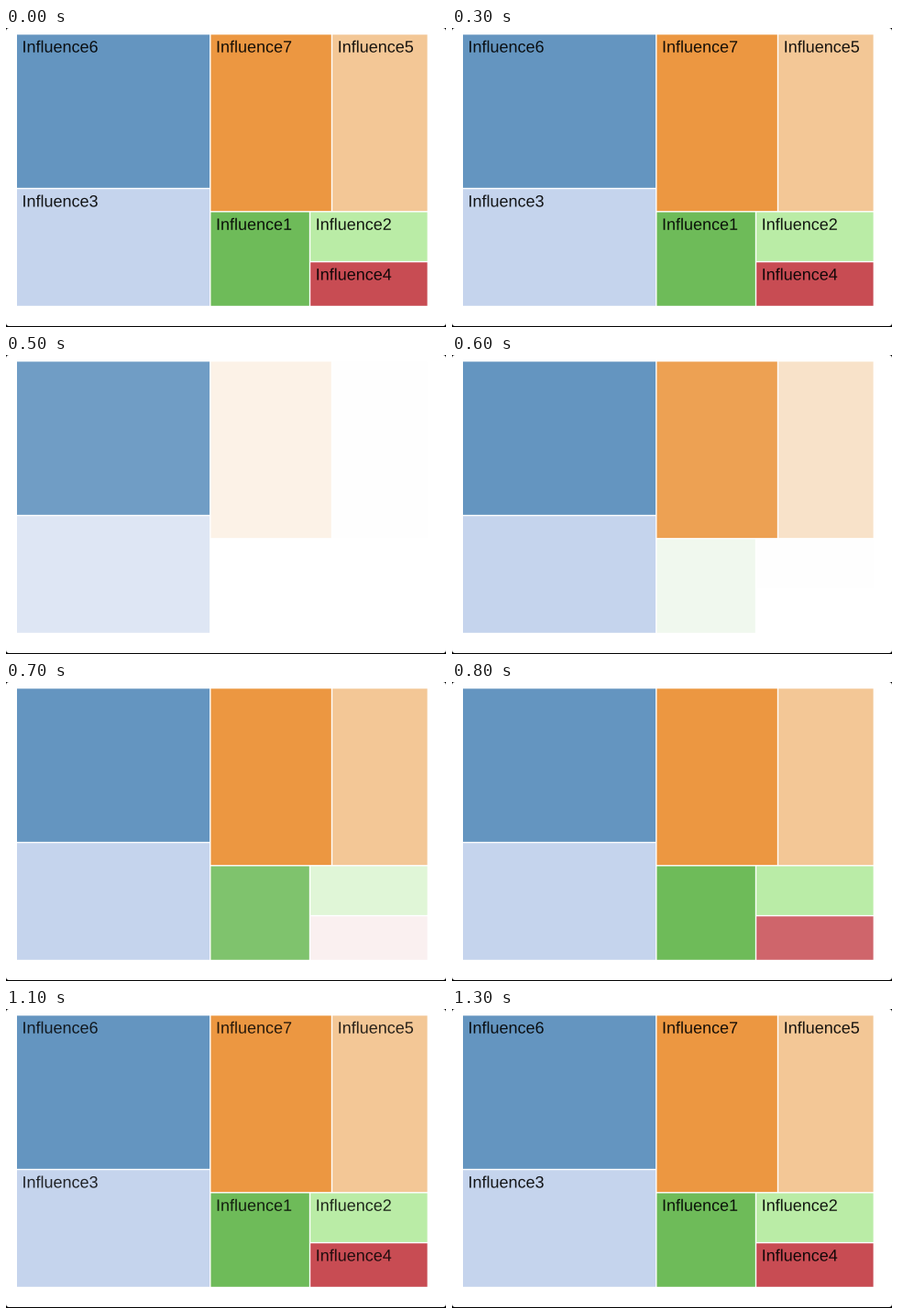
Write a matplotlib script that moves like this. It is 480 px wide and 327 px high and loops after 1.4 s.

```python
import matplotlib.pyplot as plt
from matplotlib.animation import FuncAnimation
from matplotlib.patches import FancyBboxPatch, PathPatch, Rectangle
from matplotlib.textpath import TextPath
from matplotlib.transforms import Affine2D

W, H, DPI = 480, 327, 100
STEP, FRAMES = 100, 14
RESTART = 400                              # the full chart holds until here
CELL_START, CELL_STAGGER, CELL_FADE = 317, 52.5, 250
TEXT_START, TEXT_FADE, TEXT_ALPHA = 785, 430, 0.9
GAP = 0.7

# label, left, top, right, bottom, colour, in order of appearance
CELLS = [
    ("Influence6", 11.3, 6.6, 222.8, 175.5, "#6495c0"),
    ("Influence3", 11.3, 175.5, 222.8, 304.5, "#c5d4ed"),
    ("Influence7", 222.8, 6.6, 355.5, 200.8, "#ec9741"),
    ("Influence5", 355.5, 6.6, 460.3, 200.8, "#f3c796"),
    ("Influence1", 222.8, 200.8, 331.5, 304.5, "#6ebb59"),
    ("Influence2", 331.5, 200.8, 460.3, 255.6, "#baeca6"),
    ("Influence4", 331.5, 255.6, 460.3, 304.5, "#c84c53"),
]


def ease(u):
    """Cubic in-out, clamped to 0..1."""
    u = min(max(u, 0), 1)
    return 4 * u ** 3 if u < 0.5 else 1 - 4 * (1 - u) ** 3


def make_label(x, baseline, text):
    """Text as an outline, so that it can sit between whole pixels."""
    path = TextPath((0, 0), text, size=18, prop={"family": "Liberation Sans"})
    placed = Affine2D().scale(1, -1).translate(x, baseline).transform_path(path)
    return ax.add_patch(PathPatch(placed, fc="black", lw=0, snap=False, zorder=3))


fig = plt.figure(figsize=(W / DPI, H / DPI), dpi=DPI, facecolor="black")
ax = fig.add_axes([0, 0, 1, 1])
ax.set(xlim=(0, W), ylim=(H, 0))
ax.axis("off")
ax.add_patch(FancyBboxPatch((0, 0), W, 326, boxstyle="round,pad=0,rounding_size=3.5",
                            fc="white", lw=0))

rects, labels = [], []
for name, left, top, right, bottom, colour in CELLS:
    rects.append(ax.add_patch(Rectangle(
        (left + GAP, top + GAP), right - left - 2 * GAP, bottom - top - 2 * GAP,
        fc=colour, lw=0, snap=False)))
    labels.append(make_label(left + 6.2, top + 20, name))


def draw(frame):
    t = frame * STEP
    held = t < RESTART
    text_alpha = TEXT_ALPHA * (1 if held else ease((t - TEXT_START) / TEXT_FADE))
    for i, (rect, label) in enumerate(zip(rects, labels)):
        begin = CELL_START + i * CELL_STAGGER
        rect.set_alpha(1 if held else ease((t - begin) / CELL_FADE))
        label.set_alpha(text_alpha)
    return rects + labels


anim = FuncAnimation(fig, draw, frames=FRAMES, interval=STEP, repeat=True, repeat_delay=0)
plt.show()
```
